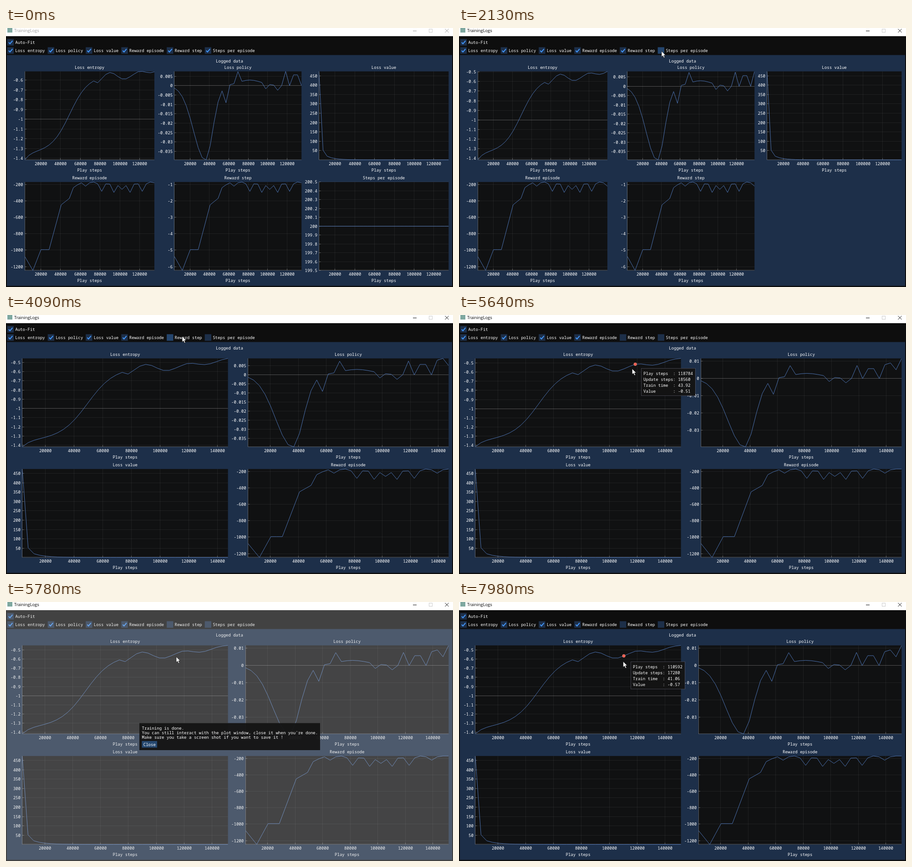
Animation, 982 px wide and 570 px high, one loop 8 s. Source, as an HTML page with a canvas:

```html
<!DOCTYPE html>
<html lang="en">
<head>
<meta charset="utf-8">
<title>TrainingLogs</title>
<style>
html, body { margin: 0; width: 100%; height: 100%; overflow: hidden; background: #0e0e0e; }
canvas { display: block; }
</style>
</head>
<body>
<canvas id="stage" width="982" height="570"></canvas>
<script>
const ctx = document.getElementById('stage').getContext('2d');
const LOOP = 8000, STEP = 4096, CHAR = 5.447;
const MONO = '9.08px "Noto Sans Mono", "DejaVu Sans Mono", monospace';
const FRAME = 'rgb(29,47,73)', HOVER = 'rgb(36,69,109)', PRESSED = 'rgb(49,105,172)', POPUP = 'rgba(20,20,20,.94)';

const tent = (x, center, width = 1) => Math.max(0, 1 - Math.abs(x - center) / width);
const bell = (x, center, width) => Math.exp(-(((x - center) / width) ** 2));

// Linear interpolation through [time, ...values] keys
function along(keys, t) {
  const i = keys.findIndex(key => key[0] > t);
  if (i < 0) return keys.at(-1).slice(1);
  const a = keys[i - 1], b = keys[i], k = (t - a[0]) / (b[0] - a[0]);
  return a.slice(1).map((v, j) => v + (b[j + 1] - v) * k);
}

// Logged curves, as functions of the sample index
function entropy(i) {
  const rise = -1.34 + 0.787 / (1 + Math.exp((11.1 - i) / 2.3)) - 0.082 * Math.exp(-i / 1.4);
  const swell = 0.044 * (1 - ((i - 15) / 22) ** 2) * Math.cos((i - 21) / 7.2 * 2 * Math.PI);
  return rise + (i > 17 ? swell : 0) + 0.011 * Math.max(0, i - 27);
}

const policyPeaks = [[13, -87], [16, 58], [23, -28], [26, -26], [28, 76], [30.5, 115], [33.53, 171], [35, 51], [36, 117]];
function policy(i) {
  const dip = -398 * bell(i, 7.8, i < 7.8 ? 4.2 : 2.6), plateau = 30 * bell(i, 19, 4);
  return policyPeaks.reduce((sum, [at, height]) => sum + height * tent(i, at), dip + plateau) / 1e4;
}

const loss = i => 0.6 + 423 * 20 ** -i + 50 * Math.exp(-i / 2);

const rewardRise = [[0, -1077], [2, -1247], [4, -994], [6, -994], [9, -448], [11, -370], [12, -239], [14, -170]];
function reward(i) {
  let value = along(rewardRise, i)[0];
  // dips spread outwards from sample 24 at growing distances
  for (let k = -3; k <= 3; k++) {
    const d = Math.abs(k), at = 24 + k * (d + 3) / 2;
    value -= (90 + 62 * d - 25 * d * d) * tent(i, at, 1.25);
  }
  return value;
}

const charts = [
  { name: 'Loss entropy', value: entropy },
  { name: 'Loss policy', value: policy },
  { name: 'Loss value', value: loss },
  { name: 'Reward episode', value: reward },
  { name: 'Reward step', value: i => reward(i) / 200, hiddenAt: 3770 },
  { name: 'Steps per episode', value: () => 200, hiddenAt: 1900 },
];
for (const chart of charts) chart.data = Array.from({ length: 37 }, (_, i) => chart.value(i));

const clicks = [[1770, 1900], [3640, 3770], [7420, 7500]];
const POPUP_OPEN = 5710, POPUP_CLOSE = 7500;

// Pointer path: time, x, y
const path = [
  [590, 668, 440], [1700, 445, 51], [2880, 445, 51], [3140, 387, 47], [5330, 387, 47], [5560, 384, 117],
  [5780, 374, 120.5], [6040, 320, 131], [6740, 319.3, 311.5], [7520, 319.3, 311.5], [7850, 360.7, 131],
];

const within = (t, [a, b]) => t >= a && t < b;
const pointCount = t => 33 + [850, 2450, 4090, 5640].filter(at => t >= at).length;
const pointer = t => t < path[0][0] ? null : along(path, t);

function rect(x, y, w, h, color) {
  ctx.fillStyle = color;
  ctx.fillRect(x, y, w, h);
}

function text(str, x, midY, align = 'left') {
  ctx.font = MONO;
  ctx.textAlign = align;
  ctx.fillStyle = '#fff';
  ctx.fillText(str, x, midY + 3.2);
}

function polyline(points, color, width = 1) {
  ctx.beginPath();
  points.forEach(p => ctx.lineTo(...p));
  ctx.strokeStyle = color;
  ctx.lineWidth = width;
  ctx.stroke();
}

function ticks(lo, hi) {
  const span = (hi - lo) * 0.99, mag = 10 ** Math.floor(Math.log10(span));
  const major = [1, 2, 5, 10].find(f => span / mag <= f) * mag, minor = major / 10;
  const list = [];
  for (let k = Math.ceil(lo / minor - 1e-6); k <= hi / minor + 1e-6; k++) {
    list.push({ value: k * minor, label: String(+(k * minor).toFixed(4)), major: k % 10 === 0 });
  }
  return list;
}

function yRange(chart, n) {
  const shown = chart.data.slice(0, n), lo = Math.min(...shown), hi = Math.max(...shown);
  return lo === hi ? [lo - 0.5, hi + 0.5] : [lo, hi];
}

function layout(visible, n) {
  const cols = visible.length > 4 ? 3 : 2, pitch = 969.6 / cols;
  const labelWidth = col => CHAR * Math.max(...visible
    .filter((_, i) => i % cols === col)
    .flatMap(chart => ticks(...yRange(chart, n)).map(k => k.label.length)));
  return visible.map((chart, i) => {
    const col = i % cols, top = 95.5 + 243.4 * Math.floor(i / cols);
    return {
      chart, top, bottom: top + 194.6,
      left: 14 + pitch * col + labelWidth(col),
      right: 2.8 + pitch * (col + 1),
    };
  });
}

function scales({ chart, left, right, top, bottom }, n) {
  const [lo, hi] = yRange(chart, n);
  return {
    x: v => left + (v - STEP) / (STEP * (n - 1)) * (right - left),
    y: v => bottom - (v - lo) / (hi - lo) * (bottom - top),
  };
}

function drawPlot(box, n) {
  const { chart, left, right, top, bottom } = box, { x, y } = scales(box, n);
  const w = right - left, h = bottom - top, mid = (left + right) / 2;
  const gridColor = k => `rgba(255,255,255,${k.major ? 0.28 : 0.065})`;
  const axisColor = 'rgba(255,255,255,.3)';
  rect(left, top, w, h, 'rgb(16,17,18)');
  for (const k of ticks(STEP, STEP * n)) {
    const px = Math.round(x(k.value));
    rect(px, top, 1, h, gridColor(k));
    rect(px, bottom - 4, 1, 4, axisColor);
    text(k.label, px + 0.5, bottom + 8.7, 'center');
  }
  for (const k of ticks(...yRange(chart, n))) {
    const py = Math.round(y(k.value) - 0.5);
    rect(left, py, w, 1, gridColor(k));
    rect(left, py, 4, 1, axisColor);
    text(k.label, left - 3.8, py + 0.5, 'right');
  }
  rect(Math.floor(left), top, 1, h, axisColor);
  rect(left, Math.floor(bottom) - 0.5, w, 1, axisColor);
  text(chart.name, mid, top - 8.7, 'center');
  text('Play steps', mid, bottom + 22.5, 'center');

  ctx.save();
  ctx.beginPath();
  ctx.rect(left, top - 1, w, h + 2);
  ctx.clip();
  polyline(chart.data.slice(0, n).map((v, i) => [x(STEP * (i + 1)), y(v)]), '#4c72b0');
  ctx.restore();
}

function drawTooltip(box, n, mouse) {
  const { x, y } = scales(box, n);
  const i = Math.round((mouse[0] - box.left) / (box.right - box.left) * (n - 1));
  const inside = i >= 0 && i < n && mouse[1] > box.top && mouse[1] < box.bottom;
  if (!inside || Math.abs(y(box.chart.data[i]) - mouse[1]) > 20) return;
  ctx.beginPath();
  ctx.arc(x(STEP * (i + 1)), y(box.chart.data[i]), 3.3, 0, 7);
  ctx.fillStyle = '#ee5c50';
  ctx.fill();
  ctx.strokeStyle = 'rgba(255,175,155,.6)';
  ctx.lineWidth = 0.8;
  ctx.stroke();

  const left = Math.round(mouse[0] + 16), top = Math.round(mouse[1] + 0.3);
  rect(left, top, 119, 61, POPUP);
  ctx.strokeStyle = 'rgba(110,110,128,.5)';
  ctx.lineWidth = 1;
  ctx.strokeRect(left + 0.5, top + 0.5, 119, 60);
  [
    `Play steps  : ${STEP * (i + 1)}`,
    `Update steps: ${640 * (i + 1)}`,
    `Train time  : ${(2.45 + 1.43 * (i + 1)).toFixed(2)}`,
    `Value       : ${box.chart.data[i].toFixed(2)}`,
  ].forEach((line, row) => text(line, left + 5, top + 11.3 + row * 13.2));
}

function drawCheckbox(label, x, midY, checked, color = FRAME) {
  rect(x, midY - 7.2, 14.4, 14.4, color);
  if (checked) polyline([[x + 3.2, midY + 0.2], [x + 6, midY + 3.2], [x + 11.6, midY - 3.4]], '#4296fa', 2);
  text(label, x + 17.5, midY);
}

function drawToolbar(t, mouse, pressed) {
  drawCheckbox('Auto-Fit', 2.7, 31.5, true);
  let x = 2.7;
  for (const { name, hiddenAt = Infinity } of charts) {
    const end = x + 17.5 + name.length * CHAR;
    const hover = mouse && within(mouse[0], [x, end]) && within(mouse[1], [42, 57]);
    drawCheckbox(name, x, 49.5, t < hiddenAt, hover ? (pressed ? PRESSED : HOVER) : FRAME);
    x = end + 6.1;
  }
}

function drawTitleBar(active) {
  rect(0, 0, 982, 18, '#fff');
  rect(3, 0, 11, 10, '#7fa8a0');
  ctx.font = '9.3px "Open Sans", "Noto Sans", sans-serif';
  ctx.textAlign = 'left';
  ctx.fillStyle = active ? '#000' : '#999';
  ctx.fillText('TrainingLogs', 18, 9.3);
  const ink = active ? '#111' : '#999';
  rect(894, 6, 8, 1, ink);
  ctx.strokeStyle = '#ccc';
  ctx.lineWidth = 1;
  ctx.strokeRect(929.5, 2.5, 7, 7);
  polyline([[964.5, 2], [972.5, 10]], ink);
  polyline([[972.5, 2], [964.5, 10]], ink);
}

function drawPopup(mouse, pressed) {
  rect(293, 266.5, 397, 59.5, POPUP);
  [
    'Training is done.',
    "You can still interact with the plot window, close it when you're done.",
    'Make sure you take a screen shot if you want to save it !',
  ].forEach((line, row) => text(line, 298.5, 278 + row * 10));
  const hover = mouse[1] > 306 && mouse[0] < 332;
  rect(298.5, 306, 33.5, 14.5, hover ? (pressed ? 'rgb(15,135,250)' : 'rgb(66,150,250)') : 'rgb(38,72,112)');
  text('Close', 301.7, 313.3);
}

function drawPointer([x, y], pressed) {
  if (pressed) {
    ctx.beginPath();
    ctx.arc(x, y + 1.3, 9.5, 0, 7);
    ctx.fillStyle = 'rgba(190,205,60,.65)';
    ctx.fill();
  }
  ctx.beginPath();
  [[0, 0], [0, 12.4], [2.8, 9.8], [5, 14.6], [7.1, 13.7], [5, 9], [8.8, 9]]
    .forEach(([dx, dy]) => ctx.lineTo(x + dx, y + dy));
  ctx.closePath();
  ctx.fillStyle = '#fff';
  ctx.fill();
  ctx.strokeStyle = '#111';
  ctx.lineWidth = 0.7;
  ctx.stroke();
}

function draw(t) {
  const tick = Math.floor((t - 40) / 70) * 70 + 40; // motion advances in 70 ms steps
  const mouse = pointer(tick), n = pointCount(t);
  const pressed = clicks.some(c => within(t, c));
  const popup = within(t, [POPUP_OPEN, POPUP_CLOSE]);
  const visible = charts.filter(c => t < (c.hiddenAt ?? Infinity));
  const boxes = layout(visible, pointCount(t - 70)); // label margins lag one step

  rect(0, 0, 982, 570, '#0e0e0e');
  drawToolbar(t, mouse, pressed);
  rect(2, 59.5, 978, 508, FRAME);
  text('Logged data', 491, 73, 'center');
  boxes.forEach(box => drawPlot(box, n));

  const dim = t < POPUP_OPEN ? 0
    : popup ? Math.min(1, (tick - 5650) * 0.006)
    : Math.max(0, 1 - (t - POPUP_CLOSE) * 0.01);
  if (dim) rect(0, 18, 982, 552, `rgba(204,204,204,${0.35 * dim})`);
  if (popup) drawPopup(mouse, pressed);
  else if (t > 5400) drawTooltip(boxes[0], n, pointer(tick - 70));

  drawTitleBar(t >= clicks[0][0]);
  if (mouse) drawPointer(mouse, pressed);
}

function frame() {
  draw(performance.now() % LOOP);
  requestAnimationFrame(frame);
}
frame();
</script>
</body>
</html>
```
